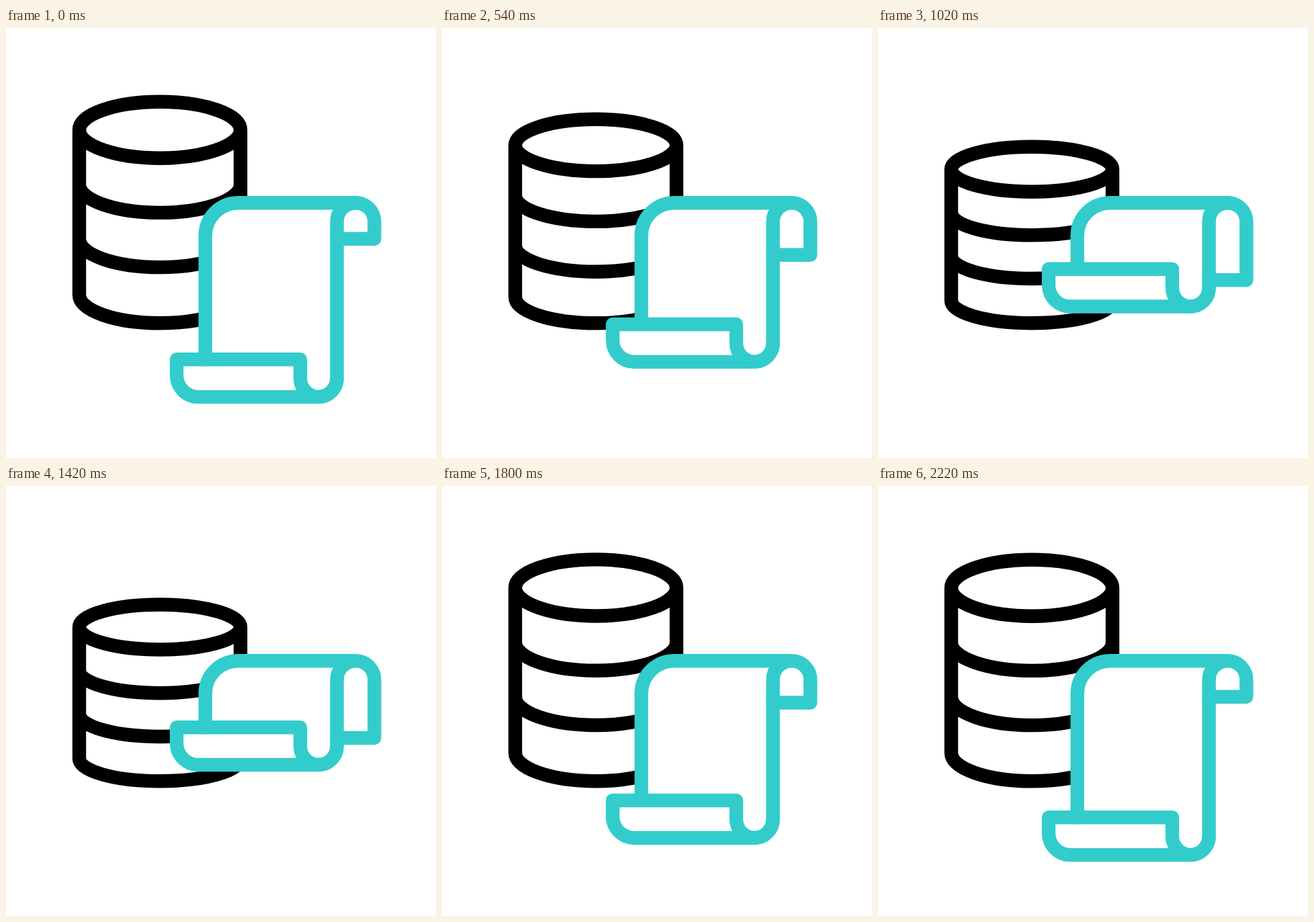
Write an HTML page that moves like this. It is 640 px wide and 640 px high and loops after 2.42 s.

```html
<!DOCTYPE html>
<html lang="en">
<head>
<meta charset="utf-8">
<title>Database and scroll</title>
<style>
  html, body { margin: 0; width: 100%; height: 100%; overflow: hidden; background: #fff; }
  svg { display: block; width: 100%; height: 100%; }
  path { fill: none; stroke-width: 20.4; stroke-linecap: round; stroke-linejoin: round; }
  #drum { stroke: #000; stroke-linecap: butt; }
  #sheet { fill: #fff; stroke: #3cc; }
  #folds { stroke: #3cc; }
</style>
</head>
<body>
<svg viewBox="0 0 640 640">
  <path id="drum"/>
  <path id="sheet"/>
  <path id="folds"/>
</svg>
<script>
const LOOP = 2420, STEP = 20;
const [drum, sheet, folds] = ['drum', 'sheet', 'folds'].map(id => document.getElementById(id));

const smooth = u => u * u * (3 - 2 * u);

// Eased value at time t through [time, value] keys.
function track(t, keys) {
  for (let i = 1; i < keys.length; i++) {
    const [t0, a] = keys[i - 1], [t1, b] = keys[i];
    if (t < t1) return a + (b - a) * smooth(Math.max(0, (t - t0) / (t1 - t0)));
  }
  return keys[keys.length - 1][1];
}

// Rest, squash, hold, overshoot, rest.
const bounce = (t, rest, squashed, over) =>
  track(t, [[200, rest], [1000, squashed], [1400, squashed], [2000, over], [2200, rest]]);

function drawDrum(top) {
  const base = 439.3, scale = (base - top) / 329.6;
  const ry = 42 * scale, first = top + ry, last = base - ry, gap = 81.2 * scale;
  const arc = (x, y, sweep) => `A120 ${ry} 0 0 ${sweep} ${x} ${y}`;
  const band = y => `M109 ${y}${arc(349, y, 0)}`;
  drum.setAttribute('d',
    `M109 ${first}${arc(349, first, 1)}${arc(109, first, 1)}Z` +
    `M109 ${first}V${last}${arc(349, last, 0)}V${first}` +
    band(first + gap) + band(first + 2 * gap));
}

function drawScroll(tab, strip) {
  const roll = strip + 28, bottom = strip + 55.8;
  sheet.setAttribute('d',
    `M296.7 ${strip}V309A48.8 48.8 0 0 1 345.5 260.2H520.4` +
    `A27.9 27.9 0 0 1 548.3 288.1V${tab}H492.6V${roll}` +
    `A27.8 27.8 0 0 1 464.8 ${bottom}H286A32 32 0 0 1 254 ${bottom - 32}V${strip}Z`);
  folds.setAttribute('d',
    `M296.7 ${strip}H438V${roll}A27.3 27.8 0 0 0 492.6 ${roll}` +
    `M492.6 ${tab}V288.1A27.9 27.9 0 0 1 520.4 260.2`);
}

function render(time) {
  const t = Math.floor(time % LOOP / STEP) * STEP;
  drawDrum(bounce(t, 109.7, 176.8, 85.8));
  drawScroll(bounce(t, 313.8, 375.3, 304), bounce(t, 493.3, 358.7, 506.2));
}

const start = performance.now();
function tick() {
  render(performance.now() - start);
  requestAnimationFrame(tick);
}
tick();
</script>
</body>
</html>
```
